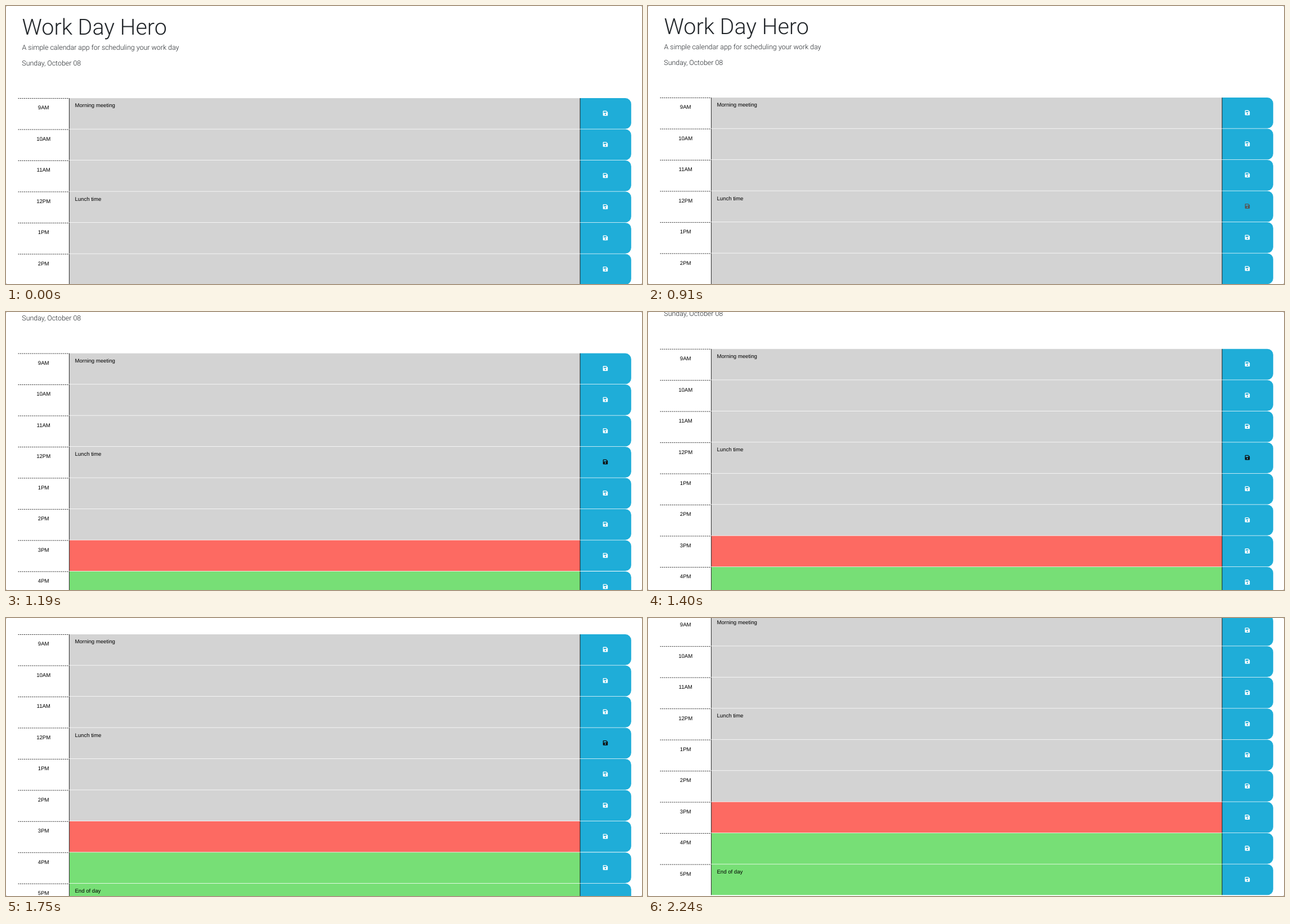
An HTML page for the animation above (3.43 s loop, 1130 by 495 pixels).

```html
<!DOCTYPE html>
<html lang="en">
<head>
<meta charset="utf-8">
<title>Work Day Hero</title>
<style>
  html, body { margin: 0; width: 100%; height: 100%; overflow: hidden; background: #fff; }
  svg { display: block; width: 1130px; height: 495px; text-rendering: geometricPrecision; }
  .head { font: 300 12.4px Roboto, sans-serif; fill: #212529; }
  .title { font-size: 39.4px; }
  .row { font: 9.6px "Liberation Sans", Arial, sans-serif; }
  .hour { text-anchor: middle; }
  .dash { stroke: #111; stroke-width: .9; stroke-dasharray: 2.08 1.39; }
  .edge { stroke: #111; stroke-width: .9; }
  .window { fill: none; stroke: #999; stroke-width: 2; }
</style>
</head>
<body>
<svg viewBox="0 0 1130 495">
  <g id="page">
    <g class="head">
      <text class="title" x="28.6" y="51.3">Work Day Hero</text>
      <text x="28.6" y="78.3">A simple calendar app for scheduling your work day</text>
      <text x="28.3" y="105.6">Sunday, October 08</text>
    </g>
    <g id="rows"></g>
  </g>
  <rect class="window" x="-1" y="-1" width="1132" height="497" rx="3"/>
</svg>
<script>
const LOOP = 3430, TOP = 164.1, PITCH = 55.47, HEIGHT = 54.7;
const PAST = '#d3d3d3', PRESENT = '#fd6a62', FUTURE = '#77df76';
const hours = ['9AM', '10AM', '11AM', '12PM', '1PM', '2PM', '3PM', '4PM', '5PM'];
const notes = { '9AM': 'Morning meeting', '12PM': 'Lunch time', '5PM': 'End of day' };
const CURRENT = 6;

// Each track is a list of [time in ms, value], held until the next entry.
const scroll = [[0, 0], [910, 1], [980, 9], [1050, 30.4], [1120, 65], [1190, 90.5],
  [1260, 94], [1400, 98.3], [1540, 99.5], [1610, 104], [1680, 113.2], [1750, 135],
  [1820, 157], [1890, 168.1], [2030, 169.3]];
const hover = {
  2: [[0, 0], [700, .3], [770, .7], [840, .3], [910, 0]],
  3: [[0, 0], [840, .3], [910, .7], [980, 1], [2170, .5], [2240, 0]]
};
const valueAt = (track, t) => track.findLast(([start]) => start <= t)[1];

const DISK = 'M-4.3-3.4a1 1 0 0 1 1-1h5l2.6 2.6v5.2a1 1 0 0 1-1 1h-6.6a1 1 0 0 1-1-1z'
  + 'M-3-3.1v2.4h4.8v-2.4zM0 .55a1.25 1.25 0 1 0 .01 0z';

function rowMarkup(hour, i) {
  const color = i < CURRENT ? PAST : i > CURRENT ? FUTURE : PRESENT;
  return `<g class="row" transform="translate(0 ${TOP + i * PITCH})">
    <path class="dash" d="M21.5 .4H112"/>
    <text class="hour" x="66.7" y="20.3">${hour}</text>
    <rect x="112.5" width="907.5" height="${HEIGHT}" fill="${color}"/>
    <text x="122.4" y="16.1">${notes[hour] || ''}</text>
    <path d="M1020 0h80.4a10.4 10.4 0 0 1 10.4 10.4v${HEIGHT - 20.8}a10.4 10.4 0 0 1-10.4 10.4h-80.4z" fill="#1fadd8"/>
    <path class="edge" d="M112.4 0v${HEIGHT}M1020 0v${HEIGHT}"/>
    <path class="disk" transform="translate(1064.9 26.9)" d="${DISK}" fill="#fff" fill-rule="evenodd"/>
  </g>`;
}

const page = document.getElementById('page');
document.getElementById('rows').innerHTML = hours.map(rowMarkup).join('');
const disks = document.querySelectorAll('.disk');

function draw(now) {
  const t = now % LOOP;
  page.setAttribute('transform', `translate(0 ${-valueAt(scroll, t)})`);
  for (const i in hover) {
    const shade = Math.round(255 - 240 * valueAt(hover[i], t));
    disks[i].setAttribute('fill', `rgb(${shade},${shade},${shade})`);
  }
  requestAnimationFrame(draw);
}
draw(0);
</script>
</body>
</html>
```
